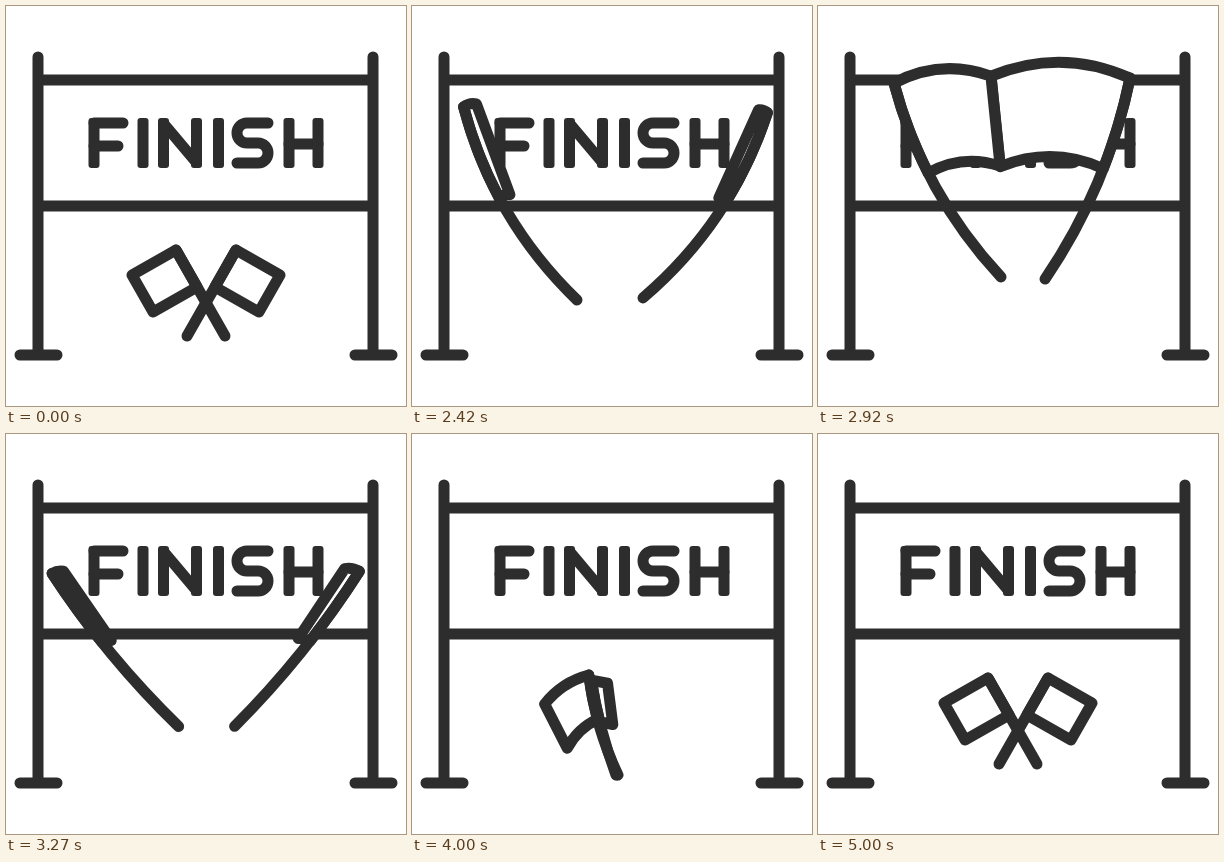
Animation, 400 px wide and 400 px high, one loop 5.02 s. Source, as an HTML page:

```html
<!DOCTYPE html>
<html lang="en">
<head>
<meta charset="utf-8">
<title>Finish line</title>
<style>
  html, body { margin: 0; width: 100%; height: 100%; overflow: hidden; background: #fff; }
  svg { display: block; width: 100%; height: 100%; }
  .line { fill: none; stroke: #2d2d2d; stroke-width: 11; stroke-linecap: round; stroke-linejoin: round; }
  .cloth { fill: #fff; }
  .stem { fill: #2d2d2d; stroke-width: 6; }
</style>
</head>
<body>
<svg viewBox="0 0 400 400" role="img" aria-label="FINISH">
  <path class="line" d="M32 51V349M367 51V349M32 74H367M32 200H367M14 349H51M349 349H386"/>
  <path class="line" d="M88 117H117M88 140H112M158 118L190 156M262 117H241A10 10 0 0 0 241 137H252A10 10 0 0 1 252 157H231M283 138H312"/>
  <defs><path id="stem" class="line stem" d="M-2.5 115h5v44h-5z"/></defs>
  <use href="#stem" x="88"/>
  <use href="#stem" x="137"/>
  <use href="#stem" x="157.5"/>
  <use href="#stem" x="190.5"/>
  <use href="#stem" x="212.5"/>
  <use href="#stem" x="283"/>
  <use href="#stem" x="312"/>
  <g id="right" transform="matrix(-1 0 0 1 400 0)"></g>
  <g id="left"></g>
</svg>
<script>
const NS = 'http://www.w3.org/2000/svg';
const LOOP = 5020, START = 2020, ATTACH = 0.43, REST_LENGTH = 99;

// time, base x y, tip x y, pole bend, upper edge dx dy, lower edge dx
const leftKeys = [
  [2200, 173, 315, 188, 180, 0.06, 56, 24, 50],
  [2420, 165, 294, 52, 101, 0.14, 13, -3, 11],
  [2580, 169, 286, 36, 118, 0.03, -20, 12, -22],
  [2780, 178, 275, 62, 92, 0.06, 28, -3, 16],
  [2920, 183, 271, 76, 77, 0.125, 97, -7, 72],
  [3300, 172, 294, 46, 142, 0.05, 6, -2, 4],
  [3620, 170, 306, 85, 126, 0, -13, -4, -36],
  [3720, 178, 317, 95, 145, -0.02, -50, 24, -54],
  [4000, 204, 341, 179, 246, 0.05, 16, 3, 13],
  [4150, 188, 338, 224, 244, 0, 44, 24, 42],
  [4720, 181, 330, 230, 244, 0, 44, 25, 44]
];

// The right flag is drawn mirrored; these poses set it apart from the left one.
const own = {
  1: [2420, 169, 292, 45, 107, 0.14, 9, -3, 8],
  4: [2920, 173, 273, 88, 72, 0.1, 139, -2, 103],
  6: [3620, 189, 313, 88, 176, 0, -45, 20, -68],
  7: [3800, 201, 333, 162, 216, 0, -24, 16, -28],
  8: [4000, 194, 341, 223, 241, -0.08, 44, 29, 30]
};
const rightKeys = leftKeys.map((key, i) => own[i] || key);

const rest = leftKeys[leftKeys.length - 1];
const lift = [START - 30, ...rest.slice(1)];

function poseAt(keys, t) {
  if (t < START || t >= rest[0]) return rest;
  const i = keys.findIndex(k => k[0] > t);
  const a = keys[i - 1], b = keys[i];
  const span = b[0] - a[0], u = (t - a[0]) / span;
  const slope = (n, j) => {
    const p = keys[n - 1], q = keys[n + 1];
    return p && q ? (q[j] - p[j]) / (q[0] - p[0]) * span : 0;
  };
  return a.map((v, j) => {
    const d = v - b[j], m = slope(i - 1, j), n = slope(i, j);
    return v + u * (m + u * (-3 * d - 2 * m - n + u * (2 * d + m + n)));
  });
}

// Control point of an arc pushed sideways from its chord.
const control = (x, y, dx, dy, k) => [x + dx / 2 + dy * k, y + dy / 2 - dx * k];

function addPath(parent, name) {
  const el = document.createElementNS(NS, 'path');
  el.setAttribute('class', name);
  return parent.appendChild(el);
}

function makeFlag(id, poses) {
  const keys = [lift, ...poses];
  const group = document.getElementById(id);
  const cloth = addPath(group, 'line cloth');
  const pole = addPath(group, 'line');
  return t => {
    const [, bx, by, tx, ty, bend, wx, wy, vx] = poseAt(keys, t);
    const vy = wx < 0 ? wy + 0.4 * (wx - vx) : wy;
    const reach = Math.max(0, Math.hypot(tx - bx, ty - by) - REST_LENGTH);
    const bulge = reach * 0.0018 + Math.max(0, -2 * bend);

    const [cx, cy] = control(bx, by, tx - bx, ty - by, bend);
    const mix = (p, q) => p + (q - p) * ATTACH;
    const hx = mix(tx, cx), hy = mix(ty, cy);
    const ax = mix(hx, mix(cx, bx)), ay = mix(hy, mix(cy, by));
    const top = control(tx, ty, wx, wy, bulge);
    const low = control(ax, ay, vx, vy, bulge);

    pole.setAttribute('d', `M${bx} ${by}Q${cx} ${cy} ${tx} ${ty}`);
    cloth.setAttribute('d', `M${tx} ${ty}Q${top} ${tx + wx} ${ty + wy}` +
      `L${ax + vx} ${ay + vy}Q${low} ${ax} ${ay}Q${hx} ${hy} ${tx} ${ty}Z`);
  };
}

const flags = [makeFlag('right', rightKeys), makeFlag('left', leftKeys)];
const begin = performance.now();

function draw() {
  const t = (performance.now() - begin) % LOOP;
  flags.forEach(flag => flag(t));
  requestAnimationFrame(draw);
}
draw();
</script>
</body>
</html>
```
